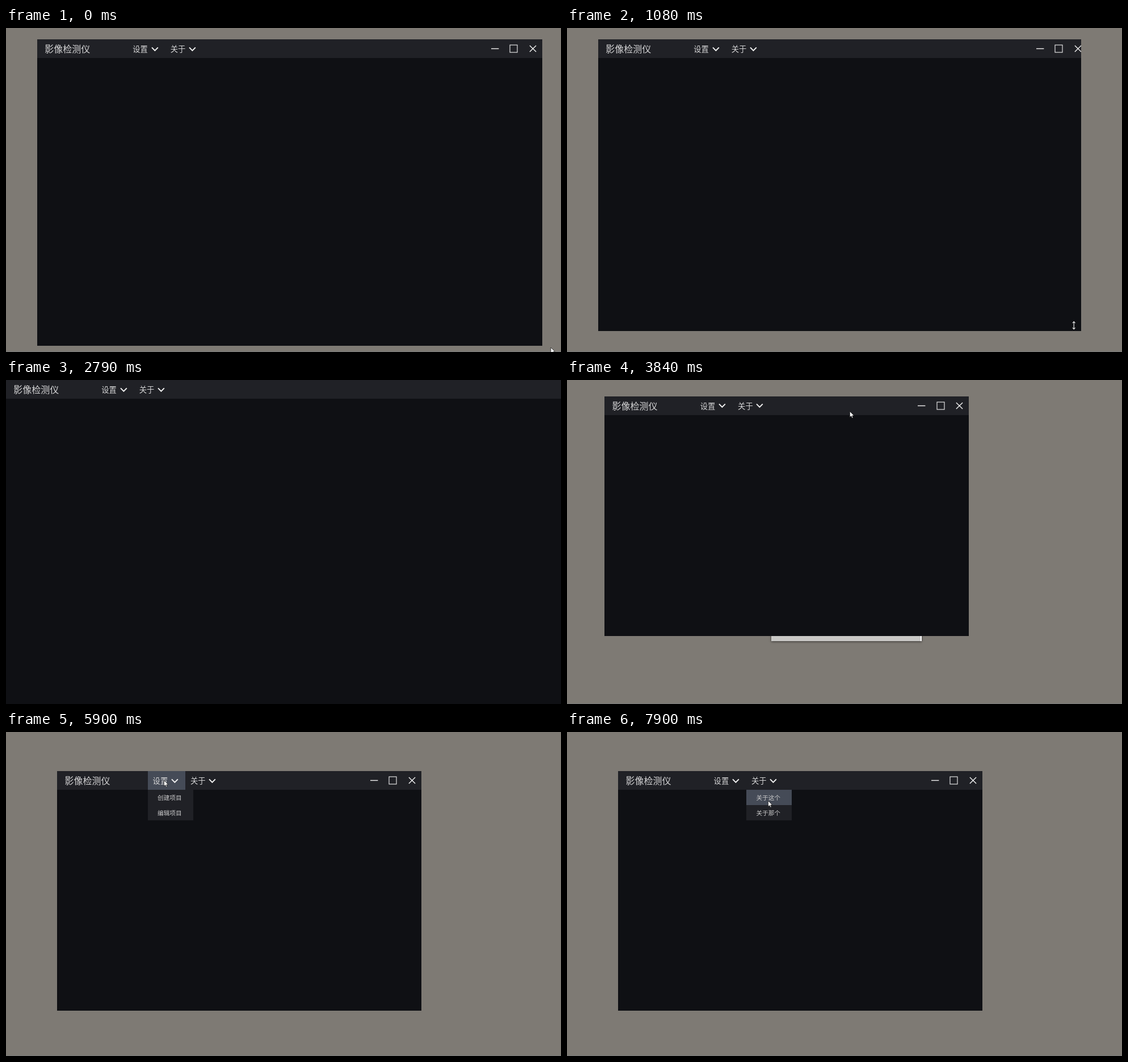
These frames come from a looping animation (978x572 px, 8 s). An HTML page:

```html
<!DOCTYPE html>
<html lang="zh-CN">
<head>
<meta charset="utf-8">
<title>影像检测仪</title>
<style>
html, body { margin: 0; width: 100%; height: 100%; overflow: hidden; background: #7e7a74; }
body { position: relative; font-family: "Noto Sans CJK SC", "Noto Sans CJK", sans-serif; font-weight: 300; color: #d6d6d7; }
div, svg { position: absolute; box-sizing: border-box; }
.edge { left: 0; right: 0; top: 571px; height: 1px; background: #7b7c7c; }
.sheet { left: 360px; top: 300px; width: 264.5px; height: 160.5px; background: #fff; box-shadow: 0 1px 4px rgba(0,0,0,.55); }
.sheet div { left: 0; right: 1.5px; top: 149px; bottom: 0; background: #c9c8c6; }
#win { background: #0f1014; overflow: hidden; }
#bar { left: 0; right: 0; top: 0; height: 33.3px; background: #202126; }
#name { left: 13.2px; top: 0; font-size: 16px; line-height: 33px; white-space: nowrap; }
.menu { top: 0; width: 66.5px; height: 33.3px; padding-left: 8.6px; font-size: 13.33px; line-height: 33px; white-space: nowrap; }
.menu svg { left: 41px; top: 12.6px; }
.list { top: 33.3px; width: 80px; height: 53.4px; background: #202126; }
.item { left: 0; width: 80px; height: 26.7px; padding-left: 17px; font-size: 10.67px; line-height: 27px; white-space: nowrap; color: #c9c9ca; }
#tools { top: 0; width: 100px; height: 33.3px; }
.tool { top: 0; width: 33.3px; height: 33.3px; }
.tool svg { left: 0; top: 0; }
.hot { background: #454b57; }
svg { overflow: visible; fill: none; stroke: #f2f2f2; }
#arrow, #sizer { left: 0; top: 0; }
#arrow { fill: #fff; stroke: #111; stroke-width: .7; }
#sizer { stroke-width: 1.1; }
</style>
</head>
<body>
<div class="edge"></div>
<div class="sheet"><div></div></div>
<div id="win">
  <div id="bar"></div>
  <div id="name">影像检测仪</div>
  <div id="tools">
    <div class="tool"><svg width="33" height="33"><path d="M10 16.5h13.4" stroke-width="1.4"/></svg></div>
    <div class="tool"><svg width="33" height="33"><rect x="10" y="10" width="13" height="13" stroke-width="1.1"/></svg></div>
    <div class="tool"><svg width="33" height="33"><path d="M10.9 10.9l11.2 11.2m0 -11.2l-11.2 11.2" stroke-width="1.4"/></svg></div>
  </div>
</div>
<svg id="arrow" width="9" height="13"><path d="M0 0V10.2L2.4 8.1L4.1 11.7L5.7 11L4.1 7.6L7.3 7.2Z"/></svg>
<svg id="sizer" width="1" height="1"><path d="M0 -6V6M-2.4 -4L0 -6.6L2.4 -4M-2.4 4L0 6.6L2.4 4"/></svg>
<script>
const LOOP = 8000, BAR = 33.3, ITEM = 26.7, MENU = 66.4;
const $ = id => document.getElementById(id);
const win = $('win'), tools = $('tools');
const buttons = [...tools.children];
buttons.forEach((b, i) => b.style.left = i * BAR + 'px');

function add(parent, cls, html, left, top) {
  const el = document.createElement('div');
  el.className = cls;
  el.innerHTML = html;
  el.style.left = left + 'px';
  if (top !== undefined) el.style.top = top + 'px';
  parent.append(el);
  return el;
}

const chevron = '<svg width="13" height="9"><path d="M1 1.4l5.4 5.5l5.4 -5.5" stroke-width="2"/></svg>';
const menus = [
  ['设置', '创建项目', '编辑项目'],
  ['关于', '关于这个', '关于那个']
].map(([label, ...names], i) => {
  const x = 159.7 + i * MENU;
  const list = add(win, 'list', '', x);
  return {
    x, list,
    head: add(win, 'menu', label + chevron, x),
    items: names.map((n, k) => add(list, 'item', n, 0, k * ITEM))
  };
});

// ms, step number: the screen refreshes in uneven steps
const clock = [[0, 0], [1080, 8], [2370, 18], [3840, 29], [4240, 32], [5900, 45], [6620, 50], [LOOP, 60.8]];
// step, width, height
const sizes = [[1, 890, 541], [5, 812, 493], [7, 872, 526], [8, 851, 515], [11, 641.8, 423]];
// step, x, y
const drag = [[28, 55, 20], [29, 66.4, 28.6], [30, 106.3, 66], [31, 104.3, 90], [32, 68.4, 75], [33, 90.3, 69.2]];
const path = [
  [14, 703, 445], [16, 632, 67], [18, 642.3, 37.5], [19, 642.3, 37.5], [20, 715, 55],
  [21, 1100, 30], [25, 1100, 30], [26, 680, 36], [28, 490, 42], [29, 498.4, 55.5],
  [30, 534, 89], [31, 530, 111], [32, 494.2, 92], [33, 514, 89], [34, 498, 106], [36, 305, 95]
];
// menu row under the pointer, one per step
const BROWSE = 37, rows = '000111210112200001210121';

// piecewise linear lookup, held at both ends
function lerp(table, s) {
  const i = table.findIndex(row => row[0] > s);
  if (i === 0) return table[0].slice(1);
  if (i < 0) return table.at(-1).slice(1);
  const a = table[i - 1], b = table[i], f = (s - a[0]) / (b[0] - a[0]);
  return a.slice(1).map((v, k) => v + (b[k + 1] - v) * f);
}

function pointer(s, w, h) {
  if (s === 0) return [960, 564];
  if (s < 11) return [42.2 + w, 10 + h];
  if (s < 14) return [700, 446];
  if (s < BROWSE) return lerp(path, s);
  const row = +rows[s - BROWSE];
  return s > 50
    ? [350 + 4.5 * row, [85.5, 121.5, 141][row]]
    : [278.4 + 2.8 * row, [85.5, 112, 141][row]];
}

const inside = (px, py, x, y, w, h) => px >= x && px < x + w && py >= y && py < y + h;

function draw(t) {
  const s = Math.floor(lerp(clock, t)[0] + 1e-6);
  const full = s >= 19 && s < 25;
  const [x, y] = full ? [0, 0] : lerp(drag, s);
  const [w, h] = full ? [1280, 720] : lerp(sizes, s);
  const span = s === 8 ? w + 11 : w;
  const [cx, cy] = pointer(s, w, h);
  const sizing = s > 0 && s < 14;
  const open = s >= 53 ? 1 : s >= 39 && s < 51 ? 0 : -1;
  const px = cx - x, py = cy - y, left = span - 3 * BAR;

  Object.assign(win.style, { left: x + 'px', top: y + 'px', width: w + 'px', height: h + 'px' });
  tools.style.left = left + 'px';

  buttons.forEach((b, i) =>
    b.classList.toggle('hot', !sizing && inside(px, py, left + i * BAR, 0, BAR, BAR)));
  menus.forEach((m, i) => {
    m.list.style.display = i === open ? 'block' : 'none';
    m.head.classList.toggle('hot', inside(px, py, m.x, 0, MENU, BAR));
    m.items.forEach((el, k) =>
      el.classList.toggle('hot', inside(px, py, m.x, BAR + k * ITEM, 80, ITEM)));
  });

  $('arrow').style.display = sizing ? 'none' : 'block';
  $('sizer').style.display = sizing ? 'block' : 'none';
  $(sizing ? 'sizer' : 'arrow').style.transform = `translate(${cx}px,${cy}px)`;
}

const start = performance.now();
function tick() {
  draw((performance.now() - start) % LOOP);
  requestAnimationFrame(tick);
}
tick();
</script>
</body>
</html>
```
